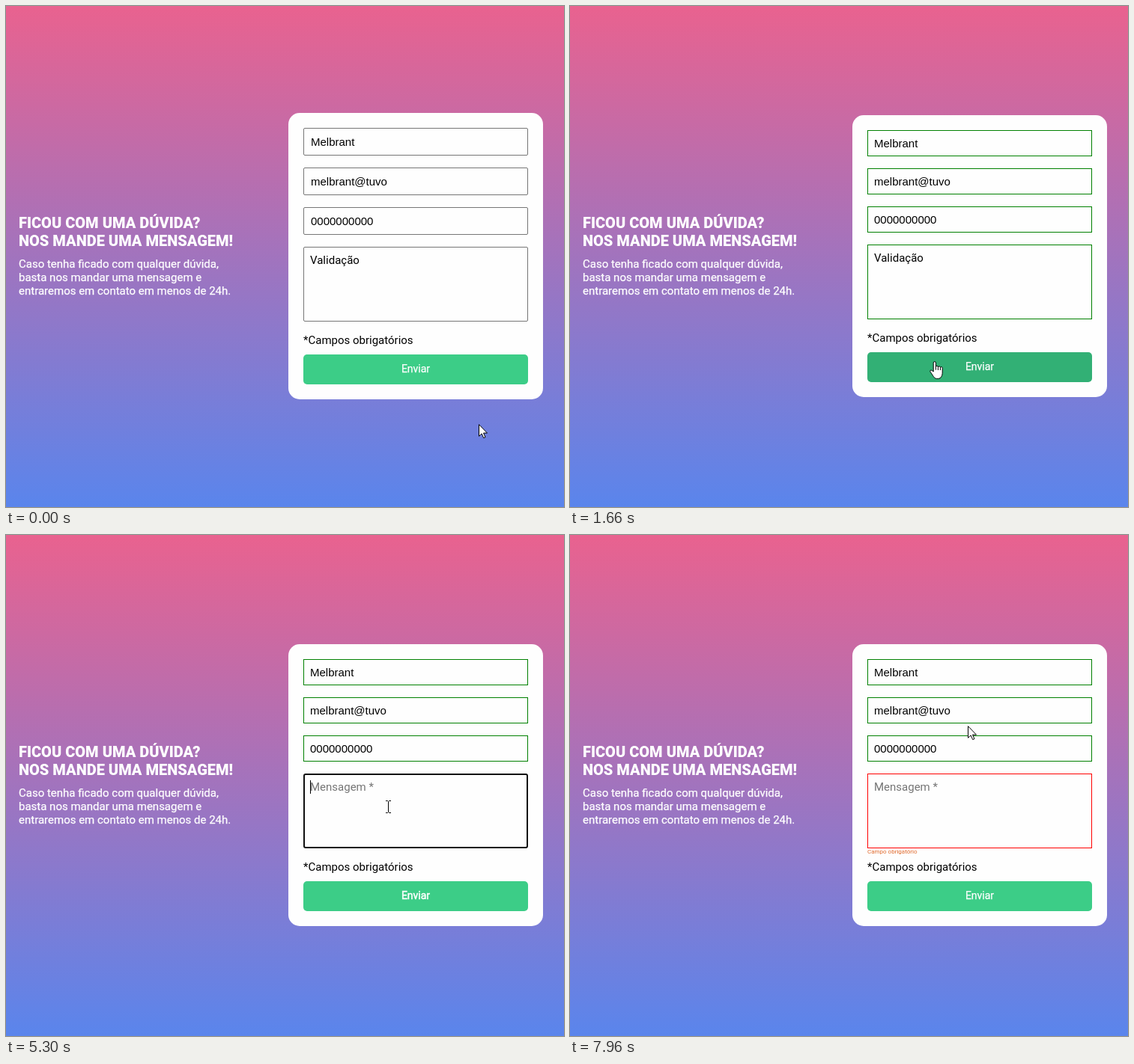
Write an HTML page that moves like this. It is 745 px wide and 670 px high and loops after 8000 ms.

```html
<!DOCTYPE html>
<html lang="pt-BR">
<head>
<meta charset="utf-8">
<title>Formulário de contato</title>
<style>
* { box-sizing: border-box; margin: 0; padding: 0; }
html, body { width: 745px; height: 670px; overflow: hidden; }
body {
  position: relative;
  background: linear-gradient(#e9628f, #5a85ec);
  font: 15px/18px Roboto, sans-serif;
}
.intro { position: absolute; left: 17px; top: 278px; color: #fff; white-space: nowrap; }
.intro h1 { font-size: 20px; font-weight: 900; line-height: 24px; margin-bottom: 10px; }
.intro p, .button { -webkit-text-stroke: .25px #fff; }
.card {
  position: absolute; left: 377px; top: 143px; width: 340px;
  padding: 20px; border-radius: 15px; background: #fefefe; color: #000;
}
.field { position: relative; border: 1px solid #767676; border-radius: 2px; margin-bottom: 16px; }
.input { height: 37px; padding: 9px; font: 15px/17px "Liberation Sans", Arial, sans-serif; }
.area { height: 100px; padding: 8px; }
.button {
  height: 40px; margin-top: 10px; border-radius: 5px; color: #fff; text-align: center;
  font-size: 14px; line-height: 39px;
}
.hint, .caret, .error { display: none; }
.hint { color: #757575; }
.caret { position: absolute; left: 8px; top: 8px; width: 1px; height: 18px; background: #000; }
.error { position: absolute; left: -1px; top: 99px; font-size: 8px; line-height: 10px; color: #e06a2c; }

.valid { top: 146px; }
.valid .field { border-color: #008000; border-radius: 0; }
.valid .input { height: 35px; padding: 8px; }
.focus .area { border: 2px solid #101010; border-radius: 3px; padding: 7px; }
.focus .caret { left: 7px; top: 7px; }
.focus .button { -webkit-text-stroke-width: .5px; }
.end .caret { left: 73px; }
.selected .value { background: #0078d7; color: #fff; }
.empty .value { display: none; }
.empty .hint { display: inline; }
.caret-on .caret, .invalid .error { display: block; }
.invalid .area { border-color: #f00; }

#cursor {
  position: absolute; left: 0; top: 0; width: 24px; height: 26px;
  overflow: visible; pointer-events: none;
}
#cursor g { display: none; fill: #fff; stroke: #000; stroke-width: 1; stroke-linejoin: round; }
#cursor.arrow .arrow, #cursor.hand .hand, #cursor.beam .beam { display: inline; }
</style>
</head>
<body>
<section class="intro">
  <h1>FICOU COM UMA DÚVIDA?<br>NOS MANDE UMA MENSAGEM!</h1>
  <p>Caso tenha ficado com qualquer dúvida,<br>basta nos mandar uma mensagem e<br>entraremos em contato em menos de 24h.</p>
</section>

<section class="card" id="card">
  <div class="field input">Melbrant</div>
  <div class="field input">melbrant@tuvo</div>
  <div class="field input">0000000000</div>
  <div class="field area">
    <span class="value">Validação</span><span class="hint">Mensagem *</span>
    <i class="caret"></i><small class="error">Campo obrigatório</small>
  </div>
  <p>*Campos obrigatórios</p>
  <div class="button" id="button">Enviar</div>
</section>

<svg id="cursor">
  <g class="arrow"><path d="M.5 .7v15.6l3.6-3.4 2.6 5.7 2.3-1-2.5-5.5h5z"/></g>
  <g class="hand" transform="translate(-6 0)">
    <path d="M5.2 14V2.2a1.6 1.6 0 0 1 3.2 0v5.5a1.5 1.5 0 0 1 3 .4 1.5 1.5 0 0 1 3 .6 1.4 1.4 0 0 1 2.8 .9v5.4c0 4.5-2 8.3-5.5 8.3H9.5c-3.5 0-4.5-4-8.4-9-1.1-1.7 .8-3 2.2-1.8z"/>
    <path fill="none" d="M8.4 7.7v4M11.4 8.2v3.8M14.4 9v3"/>
  </g>
  <g class="beam"><path fill="none" d="M-3-7.5h2.5l1 1 1-1H4M.5-6.5v14M-3 8.5h2.5l1-1 1 1H4"/></g>
</svg>

<script>
const LOOP = 8000, BLINK = 535, FADE = 200;
const SUBMIT = 1655, FOCUS = 4510, SELECT = 4635, CLEAR = 5295, REJECT = 6435;

// Each sweep of the pointer is one eased curve
const moves = [
  { start: 60, end: 860, from: [631, 559], via: [616, 462], to: [520, 477] },
  { start: 930, end: 1660, from: [520, 477], via: [505, 473], to: [486, 475] },
  { start: 3848, end: 4450, from: [484, 450], via: [492, 390], to: [510, 363] },
  { start: 5440, end: 6110, from: [510, 363], via: [514, 430], to: [528, 484] },
  { start: 7490, end: 7955, from: [528, 484], via: [512, 350], to: [531, 255] }
];

const card = document.getElementById('card');
const button = document.getElementById('button');
const cursor = document.getElementById('cursor');

const clamp = v => Math.min(1, Math.max(0, v));
const within = (v, from, to) => v >= from && v < to;
const easeOut = p => 1 - (1 - p) ** 2;

function pointer(t) {
  const { start, end, from, via, to } = moves.findLast(m => m.start <= t) || moves[0];
  const p = easeOut(clamp((t - start) / (end - start))), q = 1 - p;
  return from.map((a, i) => Math.round(q * q * a + 2 * q * p * via[i] + p * p * to[i]));
}

function shape(x, y) {
  const hit = document.elementFromPoint(x, y);
  if (hit === button) return 'hand';
  return hit && hit.closest('.field') ? 'beam' : 'arrow';
}

// The hover fade is the share of the last FADE ms spent on the button
function buttonColor(t) {
  const steps = 20;
  let dark = 0;
  for (let i = 0; i < steps; i++) {
    const y = pointer(t - i * FADE / steps)[1];
    if (within(y, 463, 506)) dark += 1 / steps;
  }
  const mix = (a, b) => Math.round(a + (b - a) * dark);
  return `rgb(${mix(60, 50)},${mix(205, 176)},${mix(135, 117)})`;
}

function render(t) {
  const blink = within(t, CLEAR, REJECT) && (t - CLEAR) % (2 * BLINK) < BLINK;
  const states = {
    valid: t >= SUBMIT,
    focus: within(t, FOCUS, REJECT),
    end: within(t, FOCUS, SELECT),
    selected: within(t, SELECT, CLEAR),
    empty: t >= CLEAR,
    'caret-on': within(t, FOCUS, SELECT) || blink,
    invalid: t >= REJECT
  };
  for (const name in states) card.classList.toggle(name, states[name]);
  button.style.background = buttonColor(t);

  const [x, y] = pointer(t);
  cursor.setAttribute('class', shape(x, y));
  cursor.style.transform = `translate(${x}px, ${y}px)`;
}

const start = performance.now();
function tick() {
  render((performance.now() - start) % LOOP);
  requestAnimationFrame(tick);
}
tick();
</script>
</body>
</html>
```
